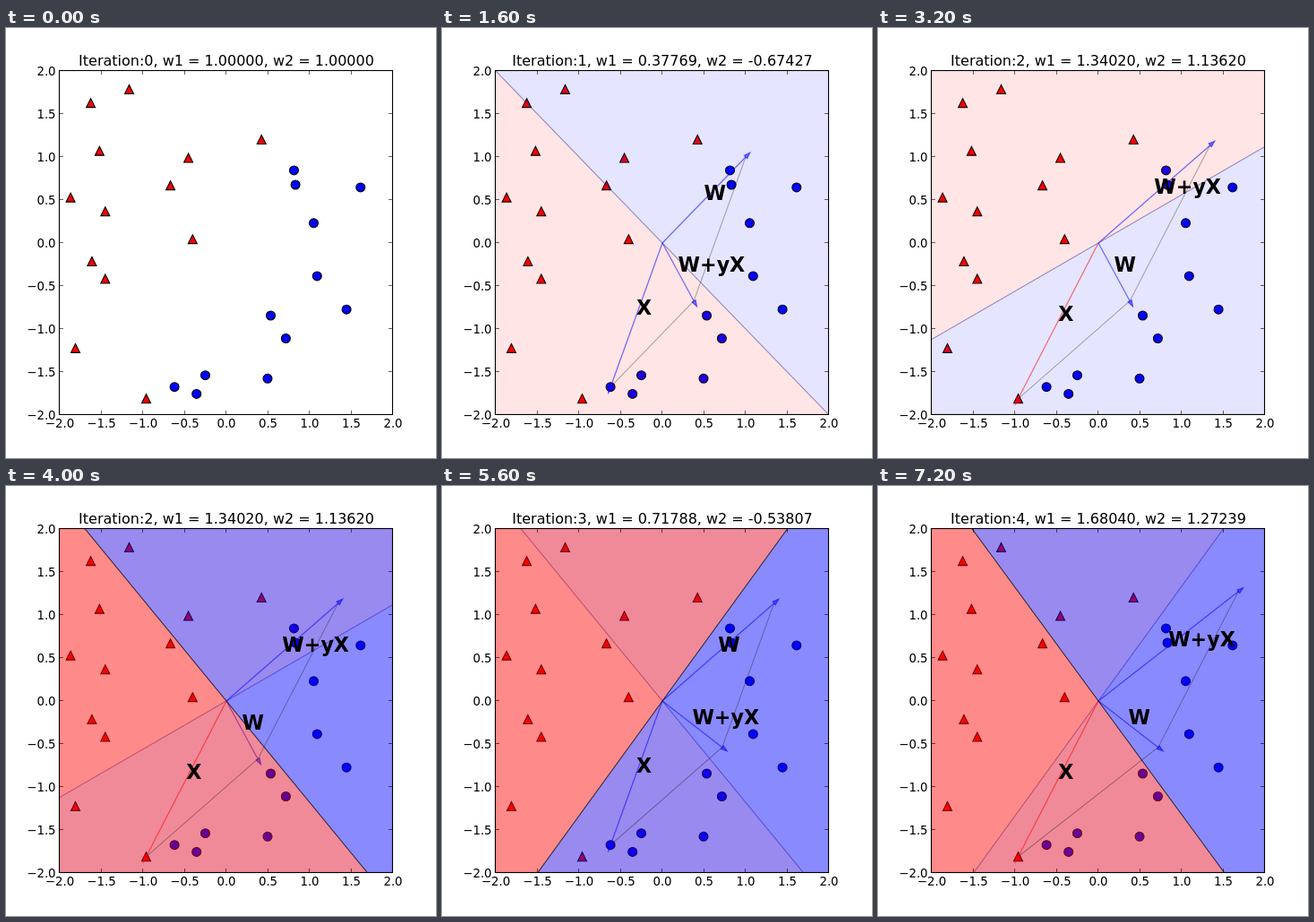
Recreate the animation shown at these times as an HTML page with a canvas. Size 480 px wide and 480 px high, loop 8 s.

```html
<!DOCTYPE html>
<html>
<head>
<meta charset="utf-8">
<style>
html, body { margin: 0; width: 100%; height: 100%; overflow: hidden; background: #fff; }
canvas { display: block; }
</style>
</head>
<body>
<canvas id="stage" width="480" height="480"></canvas>
<script>
const ctx = document.getElementById('stage').getContext('2d');
const STEP_MS = 800, STEPS = 10, LINE = 1.11;
const FONT = '"DejaVu Sans", sans-serif';
const LEFT = 59.5, TOP = 47.5, RIGHT = 431.5, BOTTOM = 431.5;

// Marker centres in pixels
const triangles = [
  [94.6, 83.7], [137.5, 68.4], [104.4, 137.2], [72.1, 189.2], [110.8, 204.7],
  [95.9, 260.4], [110.8, 280], [77.5, 357.4], [156.5, 413.8], [183.6, 175.7],
  [203.6, 145], [285.2, 124.5], [208.3, 235.6]
];
const circles = [
  [321.5, 158.9], [323.1, 175], [395.8, 177.9], [343.5, 217.8], [347.3, 276.9],
  [380.1, 314.2], [295.5, 321], [312.4, 346.5], [292, 391.3], [222.5, 387.7],
  [188.1, 400.7], [212.7, 408.4]
];

// Misclassified samples, visited in turn, with their class
const samples = [
  { x: [-0.622314, -1.674267], y: 1 },
  { x: [-0.9625125, -1.810463], y: -1 }
];
const sampleFor = i => samples[(i - 1) % 2];
const weights = [[1, 1]];
for (let i = 1; i <= 4; i++) {
  const { x, y } = sampleFor(i);
  weights.push(weights[i - 1].map((w, k) => w + y * x[k]));
}

const toPx = ([x, y]) => [246 + 93 * x, 240 - 96 * y];

function trace(points, close) {
  ctx.beginPath();
  points.forEach(p => ctx.lineTo(...p));
  if (close) ctx.closePath();
}

function strokeLine(color, width, ...points) {
  trace(points);
  ctx.strokeStyle = color;
  ctx.lineWidth = width;
  ctx.stroke();
}

function drawMarkers() {
  ctx.lineWidth = LINE;
  ctx.strokeStyle = '#000';
  const r = 4.97;
  ctx.fillStyle = '#f00';
  for (const [x, y] of triangles) {
    trace([[x, y - r], [x - r, y + r], [x + r, y + r]], true);
    ctx.fill();
    ctx.stroke();
  }
  ctx.fillStyle = '#00f';
  for (const [x, y] of circles) {
    ctx.beginPath();
    ctx.arc(x, y, r, 0, 2 * Math.PI);
    ctx.fill();
    ctx.stroke();
  }
}

function drawRegions([a, b], alpha, edge) {
  const k = 10 / Math.hypot(a, b);
  const p = [-b * k, a * k], q = [b * k, -a * k];
  for (const [side, rgb] of [[-k, '255,0,0'], [k, '0,0,255']]) {
    const shift = v => [v[0] + a * side, v[1] + b * side];
    trace([p, q, shift(q), shift(p)].map(toPx), true);
    ctx.fillStyle = `rgba(${rgb},${alpha})`;
    ctx.fill();
  }
  strokeLine(edge, LINE, toPx(p), toPx(q));
}

function drawArrow([x, y], rgb) {
  const len = Math.hypot(x, y), ux = x / len, uy = y / len;
  const color = `rgba(${rgb},0.55)`;
  strokeLine(color, 1.25, toPx([0, 0]), toPx([x, y]));
  trace([
    [x - uy * 0.025, y + ux * 0.025],
    [x + ux * 0.075, y + uy * 0.075],
    [x + uy * 0.025, y - ux * 0.025]
  ].map(toPx), true);
  ctx.fillStyle = color;
  ctx.fill();
  ctx.lineWidth = LINE;
  ctx.stroke();
}

function drawUpdateArrows(i) {
  const { x, y } = sampleFor(i);
  drawArrow(weights[i - 1], '0,0,255');
  drawArrow(x, y > 0 ? '0,0,255' : '255,0,0');
  drawArrow(weights[i], '0,0,255');
}

function drawUpdateLabels(i) {
  const { x, y } = sampleFor(i);
  const before = weights[i - 1], after = weights[i];
  const path = y > 0 ? [before, after, x] : [x, before, after];
  strokeLine('rgba(0,0,0,0.3)', LINE, ...path.map(toPx));
  ctx.font = `bold 22.2px ${FONT}`;
  ctx.fillStyle = '#000';
  ctx.textAlign = 'left';
  for (const [label, v] of [['W', before], ['X', x], ['W+yX', after]]) {
    ctx.fillText(label, ...toPx([v[0] / 2, v[1] / 2]));
  }
}

function drawAxes(i) {
  ctx.font = `13.33px ${FONT}`;
  ctx.fillStyle = '#000';
  const tick = 'rgba(0,0,0,0.6)';
  for (let k = 0; k <= 8; k++) {
    const value = k / 2 - 2;
    const label = value.toFixed(1).replace('-', '\u2212');
    const x = Math.floor(LEFT + 46.5 * k) + 0.5;
    const y = BOTTOM - 48 * k;
    strokeLine(tick, 1, [x, BOTTOM], [x, BOTTOM - 4.5]);
    strokeLine(tick, 1, [x, TOP], [x, TOP + 4.5]);
    strokeLine(tick, 1, [LEFT, y], [LEFT + 4.5, y]);
    strokeLine(tick, 1, [RIGHT, y], [RIGHT - 4.5, y]);
    ctx.textAlign = 'center';
    ctx.fillText(label, 60 + 46.5 * k, 446);
    ctx.textAlign = 'right';
    ctx.fillText(label, 55.6, y + 5);
  }
  ctx.strokeStyle = '#000';
  ctx.lineWidth = LINE;
  ctx.strokeRect(LEFT, TOP, RIGHT - LEFT, BOTTOM - TOP);

  const [w1, w2] = weights[i].map(w => w.toFixed(5));
  ctx.font = `16px ${FONT}`;
  ctx.textAlign = 'center';
  ctx.fillText(`Iteration:${i}, w1 = ${w1}, w2 = ${w2}`, 246, 42);
}

function drawStep(step) {
  const i = step >> 1;
  ctx.fillStyle = '#fff';
  ctx.fillRect(0, 0, 480, 480);

  ctx.save();
  ctx.beginPath();
  ctx.rect(LEFT, TOP, RIGHT - LEFT, BOTTOM - TOP);
  ctx.clip();
  drawMarkers();
  if (i > 0) {
    drawRegions(weights[i - 1], 0.1, 'rgba(30,20,120,0.45)');
    drawUpdateArrows(i);
  }
  if (step % 2) drawRegions(weights[i], 0.4, 'rgba(0,0,0,0.7)');
  if (i > 0) drawUpdateLabels(i);
  ctx.restore();

  drawAxes(i);
}

const start = performance.now();
let shown = -1;
function frame() {
  const step = Math.floor((performance.now() - start) / STEP_MS) % STEPS;
  if (step !== shown) drawStep(shown = step);
  requestAnimationFrame(frame);
}
frame();
</script>
</body>
</html>
```
